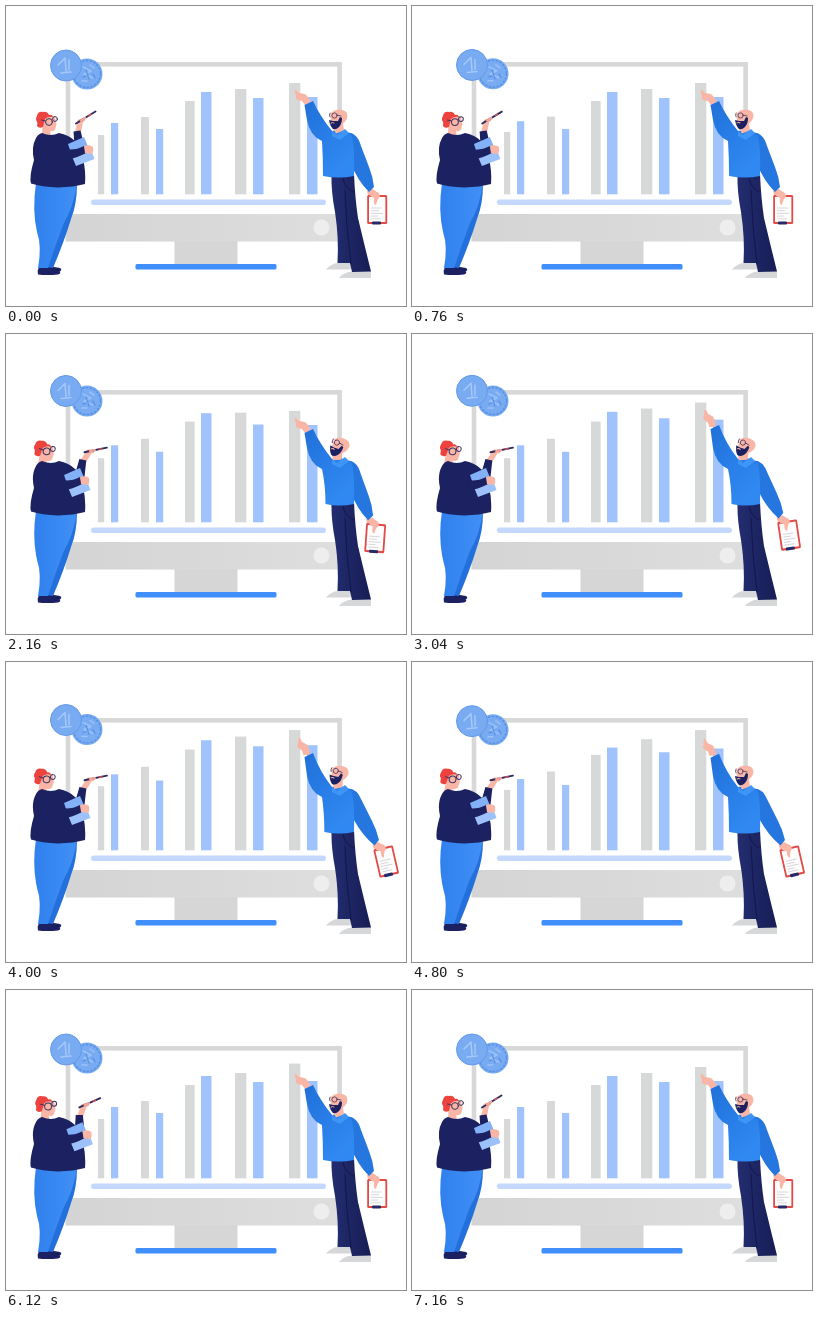
An HTML page for the animation above (7200 ms loop, 400 by 300 pixels).

```html
<!DOCTYPE html>
<html lang="en">
<head>
<meta charset="utf-8">
<title>Business chart</title>
<style>
html, body { margin: 0; width: 100%; height: 100%; overflow: hidden; background: #fff; }
svg { display: block; width: 100vw; height: 100vh; }
.skin { fill: #f9b5a5; }
.navy { fill: #1b2161; }
.line { fill: none; stroke-linecap: round; stroke-linejoin: round; }
</style>
</head>
<body>
<svg viewBox="0 0 400 300">
  <defs>
    <linearGradient id="chin"><stop stop-color="#d4d4d4"/><stop offset="1" stop-color="#dedede"/></linearGradient>
    <linearGradient id="jeans"><stop stop-color="#3080ee"/><stop offset="1" stop-color="#4090f6"/></linearGradient>
    <linearGradient id="shirt" x2=".6" y2="1"><stop stop-color="#2170d9"/><stop offset="1" stop-color="#3089f2"/></linearGradient>
    <linearGradient id="pants"><stop stop-color="#232d70"/><stop offset="1" stop-color="#171d55"/></linearGradient>
  </defs>

  <!-- monitor -->
  <rect x="62" y="58.3" width="271.6" height="165" fill="none" stroke="#d8d8d8" stroke-width="4.6"/>
  <rect x="59.5" y="208" width="276.5" height="27.5" fill="url(#chin)"/>
  <rect x="168.5" y="235" width="63" height="23.5" fill="#d6d6d7"/>
  <rect x="129.5" y="258" width="141" height="5.5" rx="1.5" fill="#418ffb"/>
  <circle cx="315.5" cy="221.5" r="8" fill="#eee"/>
  <rect x="85" y="193.5" width="235" height="5.5" rx="2.7" fill="#c4d7fc"/>
  <g id="bars"></g>

  <!-- coins -->
  <g id="backCoin" class="line">
    <circle cx="81" cy="68" r="15.5" fill="#78abf2"/>
    <circle cx="81" cy="68" r="13.5" stroke="#5890e2" stroke-width="1.4" stroke-dasharray="1.5 2.4"/>
    <path d="M77 61l8 4-7 3 9 4M76 75h5M84 59l4 3" stroke="#9cc2f8" stroke-width="1.5"/>
    <path d="M80 64l3 9M87 68l2 4M77 71l3-1" stroke="#5890e2" stroke-width="1.2"/>
  </g>
  <g id="frontCoin" class="line">
    <circle cx="60" cy="59.5" r="15.5" fill="#78abf2" stroke="#659ae8"/>
    <path d="M52 59l7-7 1 13M55 67l10-1M63 54v10" stroke="#a6c8f9" stroke-width="1.5"/>
  </g>

  <!-- woman -->
  <path class="navy" d="M40 258l8 3 6 1q3 2-1 4-11 2-19 0l-1-5z"/>
  <path class="navy" d="M33 261h9l11 4q3 2-1 3.5-11 1-20 0-1-4 1-7.5z"/>
  <path fill="#236fdc" d="M50 190L71 178Q71 198 65 213 58 236 47 262L39 261Z"/>
  <path fill="url(#jeans)" d="M30 177Q26 204 31 226 36 240 32 262L42 262Q49 240 58 217 68 200 71 177Z"/>
  <g id="womanHead">
    <path class="skin" d="M37 111q6-4 12 0l1.5 7-1.5 6q-3 2-5 1l1 4-9 1z"/>
    <path d="M31 110q1-5 6-4 4-1 6 3 3-1 4 2-5-1-8 2l-2 8q-4 2-6-1 1-4-1-6 0-3 1-4z" fill="#ec433f"/>
    <g class="line" stroke="#3d3560">
      <circle cx="43" cy="116" r="3.4"/><circle cx="49" cy="113" r="2.4"/>
      <path d="M39.5 115l-4-1"/>
    </g>
  </g>
  <path class="navy" d="M36 127Q45 131 53 127 63 129 69 135L78 142Q81 147 77 153 80 165 79 178 68 181 52 181.5 36 181 25 177.5 23 171 28 154 25 141 30 132 32 128 36 127Z"/>
  <g id="forearm">
    <path class="skin" d="M69 126l2-8q-1-4 3-5l5-1q1 3-2 4l-2 10z"/>
    <path class="line" d="M70 117.5L89.5 105.5" stroke="#2f2b60" stroke-width="1.9"/>
    <path class="line" d="M75 114.5l4-2.5" stroke="#f0a498" stroke-width="2.4"/>
    <path class="line" d="M83 109.5l2-1.2" stroke="#d8524f" stroke-width="1.5"/>
    <path class="navy" d="M67.5 125.5L74.5 124.5 79 143Q77 149 69 146Z"/>
  </g>
  <g id="papers">
    <path d="M62 138l16-7 5 12-17 7z" fill="#83b1f7"/>
    <path d="M65 148l19-7 4.5 12-18.5 7z" fill="#9dc2fb"/>
    <path class="navy" d="M58 143q11 2 20-3l2 7q-9 5-20 7z"/>
    <path class="skin" d="M78 140q6-2 9 1 1 4-1 7l-7-1z"/>
  </g>

  <!-- man -->
  <path d="M320 263.5q5-6 12-6.5h13v6.5zM333 272q5-6 13-6.5l19-.5v7z" fill="#d6d7d9"/>
  <path fill="url(#pants)" d="M325.5 168H348Q349 192 352 212L358 237 365 265.5 346 266 344 257 331.5 257Q333 232 329 206 325 185 325.5 168Z"/>
  <path class="line" d="M339 184Q340 220 345 258M337 173q2 9 10 13" stroke="#10164a" stroke-width=".9"/>
  <g id="lowArm">
    <path class="skin" d="M361 185l6-2 5 4 2 3-3 8-3 1-1-7-5-3z"/>
    <g id="board">
      <rect x="361.2" y="189" width="20" height="29" rx="1.5" fill="#e34a45"/>
      <path d="M363 191h16.4v25h-16.4z" fill="#fdfdfd"/>
      <path class="line" d="M365.5 202h10M365.5 204.7h7M365.5 207.4h11M365.5 210.1h6M365.5 212.8h9" stroke="#cfcfd5" stroke-width=".8"/>
      <rect x="366" y="215.4" width="9" height="3.2" rx="1" fill="#252a68"/>
      <path class="skin" d="M364 187q5-3 9 0l1 4q-3 2-4 8-3 0-2-7l-4-2z"/>
    </g>
    <path fill="#2576df" d="M334 128Q350 122 355 140L363 161Q367 171 368 181L363 186Q352 175 345 158Z"/>
  </g>
  <g id="hand" class="skin">
    <path d="M299 99l-3-4-4-1q-3-1-2-4l-1.5-4.5q0-2 1.5-1.5l3 3 6 1 3 3 3 5z"/>
  </g>
  <path id="torso" fill="url(#shirt)"/>
  <g id="manHead">
    <path class="skin" d="M324 109q2-5 9-5.5 8 0 8.5 6-.5 5-4.5 8l1 7-8 3-3-6q-3-5-2-12.5z"/>
    <path class="navy" d="M323 114l4 1 5 0 2-4 2 1q0 6-3 9-3 3-6 2-3-3-4-9z"/>
    <path d="M325 117q2-1 3 0" class="line" stroke="#f7b5a5"/>
    <g class="line" stroke="#54466c" stroke-width=".9">
      <circle cx="328.500" cy="109.500" r="2.600"/><path d="M331 109l4 1M324 107q-1 2 0 4"/>
    </g>
  </g>
  <path d="M326 125l5 4 8-6 4 4-9 7-8-4z" fill="#3f95f7"/>
</svg>
<script>
const LOOP = 7200, FLOOR = 188.3, GROWTH = .08;
const $ = id => document.getElementById(id);
const smooth = u => { u = Math.min(1, Math.max(0, u)); return u * u * (3 - 2 * u); };
const step = (t, mid, span) => smooth((t - mid) / span + .5);
const pulse = (t, up, upSpan, down, downSpan) => step(t, up, upSpan) - step(t, down, downSpan);

// Each series rises from left to right, then settles in the same order
const series = [
  { color: '#d7d8d8', x: [92, 135, 179, 229, 283], top: [129, 111, 95, 83, 77],
    width: i => Math.min(11.3, 6.2 + 1.7 * i), up: 650, down: i => 4600 + 1.4 * i ** 5 },
  { color: '#a0c3fe', x: [105, 150, 195, 247, 301], top: [117, 123, 86, 92, 91],
    width: i => i < 2 ? 7.2 : 10.5, up: 900, down: i => 4250 + 38 * i ** 2 }
];
const bars = series.flatMap(s => s.x.map((x, i) => {
  const el = document.createElementNS('http://www.w3.org/2000/svg', 'rect');
  el.setAttribute('x', x);
  el.setAttribute('width', s.width(i));
  el.setAttribute('fill', s.color);
  $('bars').append(el);
  return { el, size: FLOOR - s.top[i], up: s.up + 500 * i, down: s.down(i) };
}));

const place = (id, dx, dy, angle = 0, x = 0, y = 0) =>
  $(id).setAttribute('transform', `translate(${dx} ${dy}) rotate(${angle} ${x} ${y})`);

function draw(t) {
  for (const b of bars) {
    const size = b.size * (1 + GROWTH * pulse(t, b.up, 1100, b.down, 1100));
    b.el.setAttribute('y', FLOOR - size);
    b.el.setAttribute('height', size);
  }

  const float = pulse(t, 1350, 2700, 4050, 2700);
  place('frontCoin', 0, -2.8 * float);
  place('backCoin', 0, -float);

  const pen = pulse(t, 1425, 1650, 5950, 2300);
  place('forearm', 0, 0, 20 * pen, 72, 142);
  place('womanHead', -3.5 * pen, pen, 6 * pen, 40, 126);
  place('papers', -4 * pen, 3 * pen);

  const look = pulse(t, 1380, 1560, 4050, 1700);
  place('manHead', -look, 0, 18 * look, 333, 120);

  const reach = pulse(t, 2600, 900, 5200, 1600);
  place('hand', -reach, -5 * reach, 20 * reach, 301, 97);
  const lift = -4 * reach, waist = 317 + 2.5 * look;
  $('torso').setAttribute('d', `M298.5 ${99 + lift}L307 ${95 + lift}Q314 110 326 125
    Q338 122 346 130 349 145 348 170 333 173 ${waist} 170
    Q${waist} 151 316 135 304 130 301 114Z`);

  const tuck = pulse(t, 1830, 660, 2500, 700), out = pulse(t, 2900, 1400, 5450, 1300);
  place('lowArm', 0, 0, tuck - 6 * out, 342, 132);
  place('board', 0, 0, 3 * tuck - 7 * out, 369, 189);
}

const start = performance.now();
function frame() {
  draw((performance.now() - start) % LOOP);
  requestAnimationFrame(frame);
}
frame();
</script>
</body>
</html>
```
